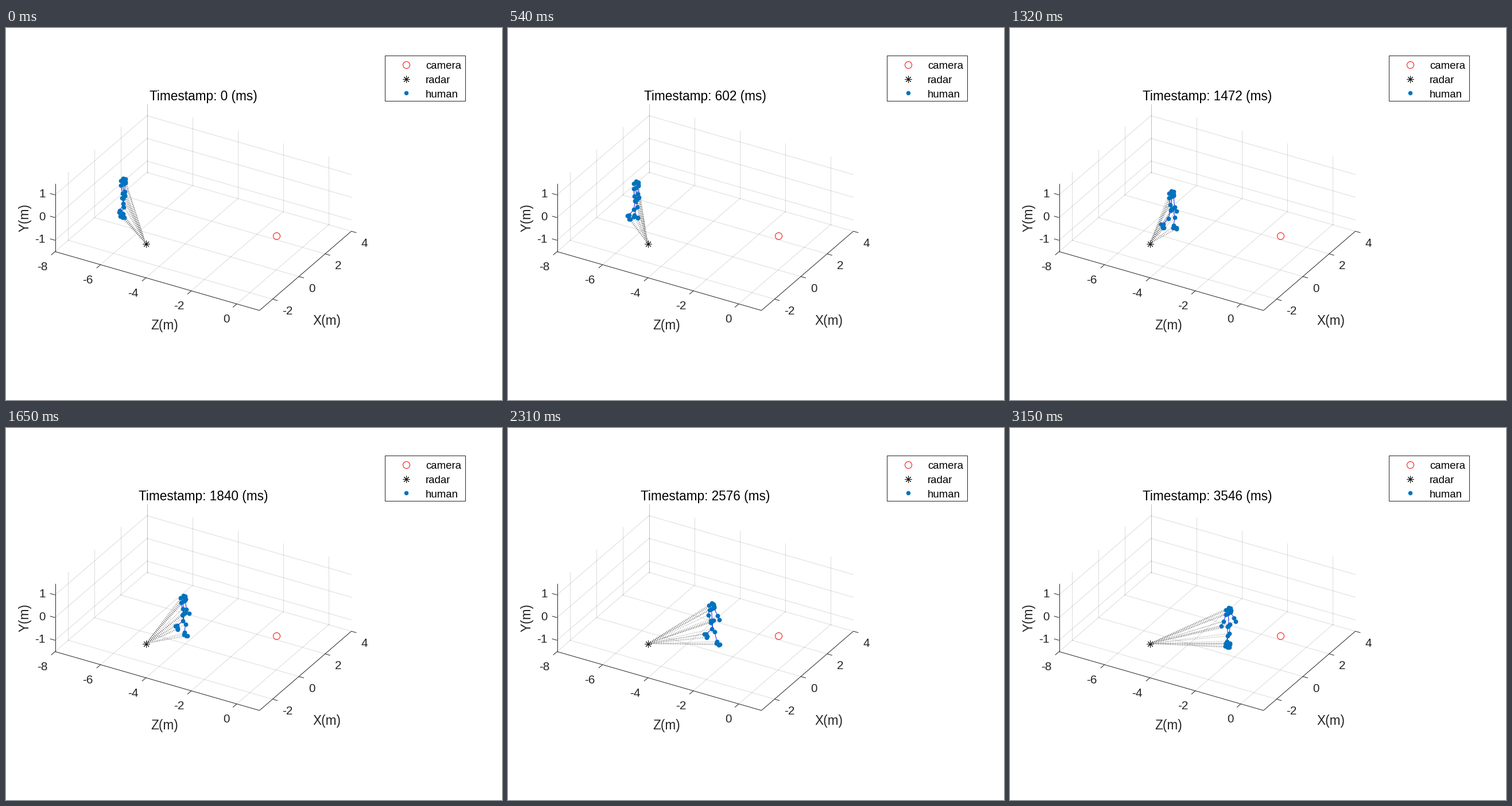
Animation, 864 px wide and 648 px high, one loop 3.18 s. Source, as a matplotlib script:

```python
import numpy as np
import matplotlib.pyplot as plt
from matplotlib.animation import FuncAnimation
from matplotlib.collections import LineCollection

W, H, DPI = 864, 648, 100
PX = 72 / DPI                      # points per pixel
FRAMES, STEP = 106, 30
INK, BLUE = "#262626", "#0072BD"
RADAR = np.array([244, 376])
THIGH, SHIN = 0.40, 0.38

plt.rcParams["font.family"] = "Liberation Sans"
fig = plt.figure(figsize=(W / DPI, H / DPI), dpi=DPI, facecolor="white")
ax = fig.add_axes([0, 0, 1, 1])
ax.set_xlim(0.5, W + 0.5)
ax.set_ylim(H + 0.5, 0.5)
ax.axis("off")


def project(x, y, z):
    """World metres to stage pixels."""
    u, v, w = x + 3, y + 1.5, z + 8
    return np.array([86 + 39.56 * w + 22.86 * u,
                     390 + 11.39 * w - 19.71 * u - 39.5 * v])


def segment(a, b, **style):
    ax.plot(*zip(a, b), **style)


def label(x, y, text, size=20.8, ha="center", color=INK, **kw):
    """Text with its capitals centred on y."""
    return ax.text(x, y + 0.36 * size, text, fontsize=size * PX, ha=ha,
                   va="baseline", color=color, **kw)


# ---------- static scene ----------
grid = dict(color=INK, alpha=0.16, lw=1 * PX, zorder=1)
axis = dict(color=INK, lw=1 * PX, zorder=2, solid_capstyle="butt")
out_x = np.array([-6.8, 5.9])
out_z = np.array([8.8, 2.5])

for z in range(-8, 1, 2):
    segment(project(-3, -1.5, z), project(4, -1.5, z), **grid)
    segment(project(4, -1.5, z), project(4, 1.5, z), **grid)
    p = project(-3, -1.5, z)
    segment(p, p + out_x, **axis)
    label(p[0] - (22 if z else 18.5), p[1] + 25, str(z))
for x in range(-2, 5, 2):
    segment(project(x, -1.5, -8), project(x, -1.5, 1), **grid)
    segment(project(x, -1.5, -8), project(x, 1.5, -8), **grid)
    p = project(x, -1.5, 1)
    segment(p, p + out_z, **axis)
    label(p[0] + (25.5 if x < 0 else 22.5), p[1] + 19.5, str(x))
for y in (-1, 0, 1):
    segment(project(-3, y, -8), project(4, y, -8), **grid)
    segment(project(4, y, -8), project(4, y, 1), **grid)
    p = project(-3, y, -8)
    segment(p, p - out_z, **axis)
    label(69.5, p[1] - 3, str(y), ha="right")

corner = project(-3, -1.5, -8)
segment(corner, project(-3, 1.5, -8), **axis)
segment(corner, project(-3, -1.5, 1), **axis)
segment(project(-3, -1.5, 1), project(4, -1.5, 1), **axis)

label(277, 517, "Z(m)", 22.6)
label(559, 509, "X(m)", 22.6)
ax.text(40, 331, "Y(m)", fontsize=22.6 * PX, color=INK, rotation=90,
        rotation_mode="anchor", ha="center", va="baseline")
title = label(344, 118, "", 22.6, color="black")


def camera(p):
    ax.plot(*p, "o", ms=12 * PX, mfc="none", mec="red", mew=1 * PX, zorder=3)


def radar(p):
    ax.plot(*p, marker=(8, 2, 0), ms=12 * PX, mec="black", mew=0.9 * PX, zorder=3)


camera((471, 362.5))
radar(RADAR)

ax.add_patch(plt.Rectangle((660, 48), 140, 79, fc="white", ec=INK, lw=1 * PX))
camera((697, 64))
radar((697, 89))
ax.plot(697, 113.5, "o", ms=7.5 * PX, color=BLUE, mew=0)
for y, name in ((64.5, "camera"), (89.5, "radar"), (114.5, "human")):
    label(731.5, y, name, 18.7, ha="left", color="black")

# ---------- walking figure ----------
# tick, root z, gait phase, foot centre, stride, heel lift, ankle floor,
# elbow and wrist reach (left, right), wrist height (left, right)
KEYS = np.array([
    (0, -6.72, -0.5, -.14, .08, 0.1, -.95, -.05, -.08, 0.05, 0.10, -.25, -.15),
    (18, -6.24, 0.0, -.21, .06, 0.8, -.97, -.03, 0.00, 0.00, 0.06, -.20, -.15),
    (44, -4.77, 1.0, -.15, .17, 1.0, -.97, 0.02, 0.09, 0.02, 0.08, -.35, -.10),
    (65, -3.48, 2.0, -.09, .26, 1.0, -.94, 0.05, 0.16, 0.05, 0.12, -.16, -.06),
    (77, -2.91, 2.5, -.02, .29, 1.0, -.96, 0.15, 0.21, -.07, 0.05, -.16, -.05),
    (89, -2.47, 3.0, 0.04, .23, 0.7, -.91, 0.06, 0.11, 0.00, 0.12, -.09, 0.00),
    (106, -2.26, 3.5, -.11, .04, 0.0, -.98, 0.12, 0.19, -.14, -.22, -.07, -.17),
])
TICKS, VALUES = KEYS[:, 0], KEYS[:, 1:]
SLOPES = np.gradient(VALUES, TICKS, axis=0)


def state(t):
    """Smooth Hermite interpolation between the key poses."""
    i = min(np.searchsorted(TICKS, t, side="right") - 1, len(TICKS) - 2)
    span = TICKS[i + 1] - TICKS[i]
    s = (t - TICKS[i]) / span
    return ((1 + 2 * s) * (1 - s) ** 2 * VALUES[i] + s * (1 - s) ** 2 * span * SLOPES[i]
            + s * s * (3 - 2 * s) * VALUES[i + 1] + s * s * (s - 1) * span * SLOPES[i + 1])


def leg(side, phase, centre, stride, lift, floor):
    """Hip, knee, ankle, heel and toes; side is -1 (right) or 1 (left)."""
    turn = 2 * np.pi * (phase + (side > 0) / 2)
    x, hip_h = 0.1 * side, -0.2
    az = centre - stride * np.cos(turn)
    ah = floor + 0.09 * lift * max(0, np.cos(turn - 0.6))
    dz, dh = az, ah - hip_h
    reach = min(np.hypot(dz, dh), THIGH + SHIN - 0.005)
    bend = np.arccos((THIGH ** 2 + reach ** 2 - SHIN ** 2) / (2 * THIGH * reach))
    aim = np.arctan2(dz, -dh) + bend
    knee = (x, hip_h - THIGH * np.cos(aim), THIGH * np.sin(aim))

    pitch = 0.87 * lift * max(0, np.cos(turn))
    c, s = np.cos(pitch), np.sin(pitch)

    def foot(z, h, dx=0):
        return (x + dx, ah + h * c - z * s, az + z * c + h * s)

    ankle, toe = (x, ah, az), foot(.14, -.09)
    return [[(0, hip_h, 0), (x, hip_h, 0), knee, ankle, toe],
            [ankle, foot(-.03, -.09)],
            [toe, foot(.11, -.09, .05 * side)]]


def figure(t):
    """Polylines of the body in stage pixels."""
    z, *gait, le, lw, re, rw, lh, rh = state(t)
    neck, nose = (0, .34, -.02), (0, .485, .09)
    chains = [[nose, neck, (0, -.2, 0)]]
    for side, elbow, wrist, h in ((-1, re, rw, rh), (1, le, lw, lh)):
        chains.append([nose, (.04 * side, .565, .05), (.1 * side, .535, -.07)])
        chains.append([neck, (.12 * side, .34, -.02 + .03 * side),
                       (.17 * side, h + .18 - .02 * side, elbow),
                       (.2 * side, h, wrist)])
        chains += leg(side, *gait)
    return [np.array([project(x, y, z + dz) for x, y, dz in c]) for c in chains]


rays = LineCollection([], colors="0.42", linewidths=0.9 * PX,
                      linestyles=[(0, (1.1, 2.2))], zorder=4)
bones = LineCollection([], colors="blue", linewidths=0.9 * PX, zorder=5)
ax.add_collection(rays, autolim=False)
ax.add_collection(bones, autolim=False)
dots, = ax.plot([], [], "o", ms=7.8 * PX, color=BLUE, mew=0, zorder=6)


def update(i):
    tick = i + (i > 96)            # one sample is skipped near the end
    title.set_text(f"Timestamp: {round(33.45 * tick)} (ms)")
    chains = figure(tick)
    joints = np.unique(np.vstack(chains).round(3), axis=0)
    rays.set_segments([(RADAR, j) for j in joints])
    bones.set_segments(chains)
    dots.set_data(*joints.T)
    return title, rays, bones, dots


anim = FuncAnimation(fig, update, frames=FRAMES, interval=STEP, repeat=True,
                     repeat_delay=0, blit=False)
plt.show()
```
